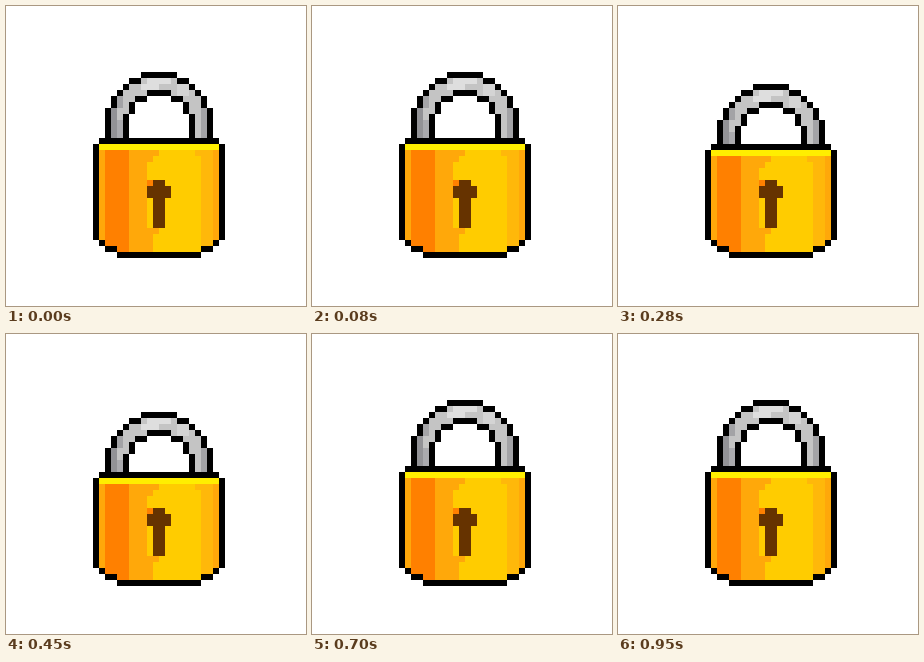
Recreate the animation shown at these times as an HTML page with a canvas. Size 300 by 300 pixels, loop 1.12 s.

```html
<!DOCTYPE html>
<html lang="en">
<head>
<meta charset="utf-8">
<title>Padlock</title>
<style>
html, body { margin: 0; height: 100%; overflow: hidden; background: #fff; }
canvas { display: block; }
</style>
</head>
<body>
<canvas id="stage" width="300" height="300"></canvas>
<script>
const ctx = document.getElementById('stage').getContext('2d');
const CELL = 6, LEFT = 87, TOP = 66, COLS = 22;
const BLACK = '#000', AMBER = '#ffa80a', GOLD = '#ffcc00';

// All coordinates are in cells of the pixel grid.
function box(x, y, w, h, color) {
  ctx.fillStyle = color;
  ctx.fillRect(LEFT + x * CELL, TOP + y * CELL, w * CELL, h * CELL);
}

function pair(x, y, w, h, color) {
  box(x, y, w, h, color);
  box(COLS - x - w, y, w, h, color);
}

// A centred shape given by the left edge of each row.
function rows(edges, y, color) {
  edges.forEach((x, i) => box(x, y + i, COLS - 2 * x, 1, color));
}

function shackle(y) {
  rows([8, 6, 5, 4, 3, 3, 2, 2, 2, 2, 2], y, BLACK);
  rows([8, 6, 5, 4, 4, 3, 3, 3, 3, 3], y + 1, '#c4c4c4');
  box(9, y + 1, 4, 1, '#dedede');
  box(8, y + 2, 3, 1, '#dedede');
  box(14, y + 2, 2, 2, '#d4d4d4');
  box(4, y + 4, 1, 2, '#a3a3a6');
  box(3, y + 6, 1, 5, '#929296');
  box(4, y + 8, 1, 3, '#aaaaae');
  box(18, y + 6, 1, 5, '#a3a3a6');
  rows([9, 7, 6, 6, 5, 5, 5, 5], y + 3, BLACK);
  rows([9, 7, 7, 6, 6, 6, 6], y + 4, '#fff');
}

function body(y) {
  box(0, y, COLS, 31 - y, '#fff');
  box(1, y, 20, 1, BLACK);
  pair(0, y + 1, 1, 27 - y, BLACK);
  pair(1, 28, 1, 1, BLACK);
  pair(2, 29, 2, 1, BLACK);
  box(4, 30, 14, 1, BLACK);

  box(1, y + 1, 20, 27 - y, GOLD);
  box(2, 28, 18, 1, GOLD);
  box(4, 29, 14, 1, GOLD);
  box(1, y + 1, 20, 1, '#ffee00');

  const top = y + 2;
  box(1, top, 1, 28 - top, AMBER);
  box(2, top, 4, 29 - top, '#ff8000');
  box(4, 29, 2, 1, '#ff8000');
  box(6, top, 3, 30 - top, AMBER);
  box(9, top, 2, 1, AMBER);
  box(9, top + 1, 1, 1, AMBER);
  box(9, 26, 2, 1, AMBER);
  box(9, 27, 1, 3, AMBER);
  box(20, top, 1, 28 - top, AMBER);
  box(17, top, 3, 1, '#ffb80a');
  box(18, top + 1, 2, 28 - top, '#ffb80a');

  box(9, 18, 1, 1, '#ff8000');
  box(10, 18, 2, 8, '#663300');
  box(9, 19, 4, 2, '#663300');
}

function draw(now) {
  const t = now % 1120;
  const drop = t < 140 || t >= 700 ? 0 : t >= 280 && t < 560 ? 2 : 1;
  ctx.fillStyle = '#fff';
  ctx.fillRect(0, 0, 300, 300);
  shackle(drop);
  body(11 + Math.min(drop, 1));
  requestAnimationFrame(draw);
}
draw(performance.now());
</script>
</body>
</html>
```
